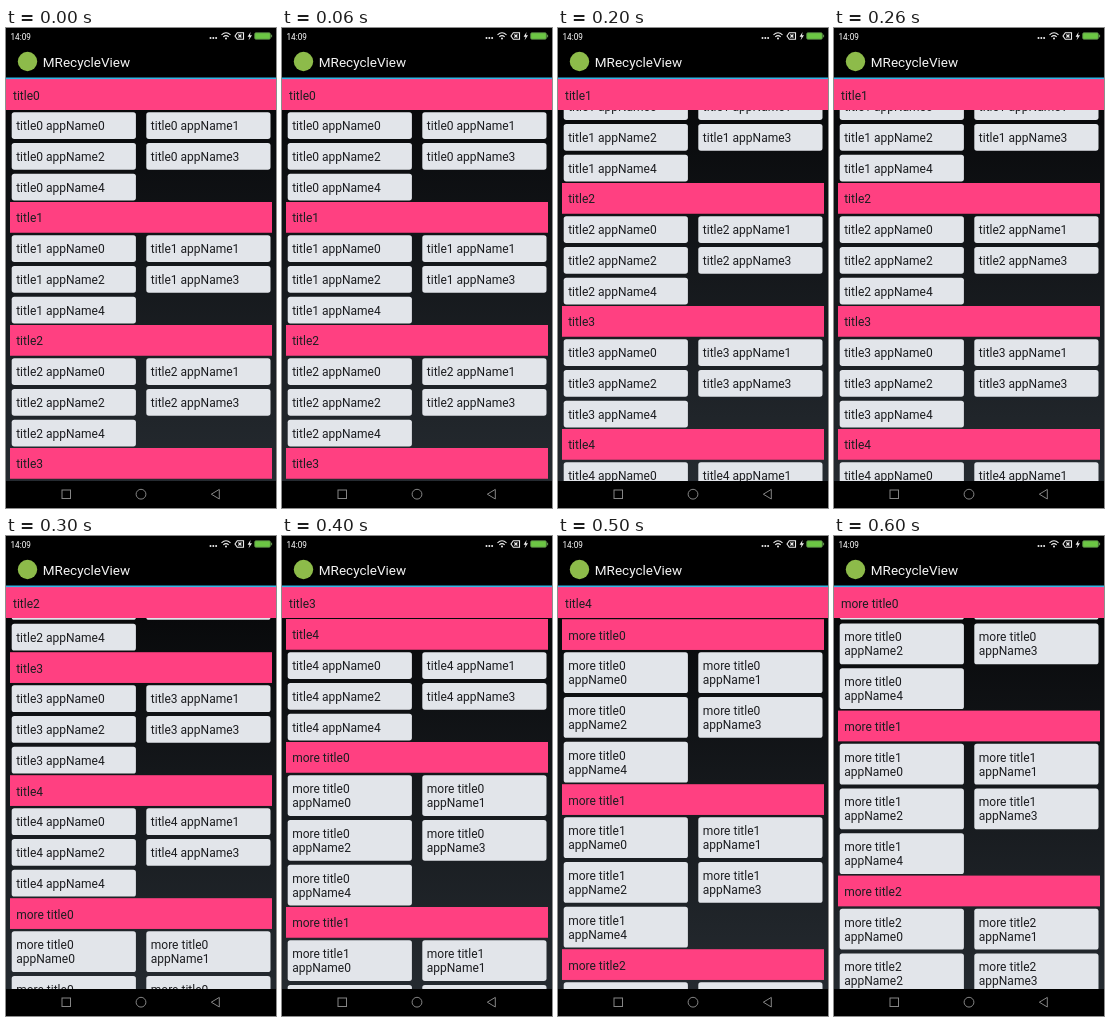
These frames come from a looping animation (270 px wide and 480 px high, 0.7 s). An HTML page:

```html
<!DOCTYPE html>
<html lang="en">
<head>
<meta charset="utf-8">
<title>Sticky section list</title>
<style>
  html, body { margin: 0; width: 100%; height: 100%; overflow: hidden; background: #000; }
  svg { display: block; width: 100%; height: 100%; }
  text { font-family: Roboto, "Noto Sans", sans-serif; font-size: 12px; fill: #1c1d20; }
  .bar { fill: #ff4081; }
  .item { fill: #e2e5ea; }
  .nav { fill: none; stroke: #858585; stroke-width: 1; }
</style>
</head>
<body>
<svg viewBox="0 0 270 480">
  <defs>
    <linearGradient id="backdrop" x1="0" y1="0" x2="0" y2="1">
      <stop offset="0" stop-color="#020203"/>
      <stop offset="1" stop-color="#272d33"/>
    </linearGradient>
    <clipPath id="viewport"><rect y="51" width="270" height="402"/></clipPath>
  </defs>
  <rect width="270" height="480" fill="url(#backdrop)"/>
  <g id="list" clip-path="url(#viewport)"></g>
  <rect class="bar" y="51" width="270" height="31"/>
  <text id="sticky" x="7" y="71.8"></text>

  <!-- status and title bars -->
  <rect width="270" height="50" fill="#000"/>
  <rect y="49.5" width="270" height="1.6" fill="#33b5e5"/>
  <text x="4.5" y="11.5" style="font-size:8.2px;fill:#fff">14:09</text>
  <g fill="#eee">
    <circle cx="204.5" cy="10" r="1"/><circle cx="207.3" cy="10" r="1"/><circle cx="210.1" cy="10" r="1"/>
    <circle cx="220" cy="10.6" r="1"/>
    <path d="M244.6 4 241.6 8.7H243.6L242.6 12.2 246 7.3H244Z"/>
  </g>
  <g fill="none" stroke="#eee" stroke-width="1.1">
    <path d="M215.5 6.8Q220 2.8 224.5 6.8M217.3 8.8Q220 6.5 222.7 8.8"/>
    <path d="M229 8 231.3 4.8H237.5V11.2H231.3ZM232.4 6.5 235.4 9.5M235.4 6.5 232.4 9.5"/>
  </g>
  <rect x="248.7" y="4.8" width="15.6" height="6.4" rx="1.2" fill="#6cc644" stroke="#5c8a4a" stroke-width=".8"/>
  <rect x="264.8" y="6.7" width="1.3" height="2.6" fill="#5c8a4a"/>
  <circle cx="21.5" cy="33.5" r="9.7" fill="#8dbb4a"/>
  <text x="36.8" y="39" style="font-size:13.5px;fill:#f3f3f3">MRecycleView</text>

  <!-- navigation bar -->
  <rect y="453" width="270" height="27" fill="#000"/>
  <rect class="nav" x="56" y="462" width="8.5" height="8.5"/>
  <circle class="nav" cx="135" cy="466.2" r="4.9"/>
  <path class="nav" d="M213.3 461.4V471L205.3 466.2Z"/>
</svg>
<script>
const TOP = 51, BOTTOM = 453, HEADER = 30.75, ROW = 30.75, LINE = 14;
const STEP = 100;
const scrollStops = [0, 0, 142, 303.8, 460, 582.8, 656.4];

const sections = [];
let contentHeight = 0;
for (let i = 0; i < 8; i++) {
  const title = i < 5 ? `title${i}` : `more title${i - 5}`;
  const lines = i < 5 ? 1 : 2;
  const pitch = ROW + (lines - 1) * LINE;
  sections.push({ title, lines, pitch, y: contentHeight });
  contentHeight += HEADER + 3 * pitch;
}

const rect = (cls, x, y, w, h, r = 0) =>
  `<rect class="${cls}" x="${x}" y="${y}" width="${w}" height="${h}" rx="${r}"/>`;
const label = (x, middle, value) => `<text x="${x}" y="${middle + 4.3}">${value}</text>`;

function item(section, index, y) {
  const x = index % 2 ? 140.3 : 5.7;
  const height = section.pitch - 4;
  const middle = y + height / 2 + 0.3;
  const name = `appName${index}`;
  const caption = section.lines === 1
    ? label(x + 4.5, middle, `${section.title} ${name}`)
    : label(x + 4.5, middle - LINE / 2, section.title) + label(x + 4.5, middle + LINE / 2, name);
  return rect('item', x, y, 124.2, height, 2.6) + caption;
}

function drawSection(section, y) {
  let out = rect('bar', 4, y, 262, HEADER) + label(10.2, y + 16, section.title);
  for (let i = 0; i < 5; i++) {
    out += item(section, i, y + HEADER + 2.4 + Math.floor(i / 2) * section.pitch);
  }
  return out;
}

const list = document.getElementById('list');
const sticky = document.getElementById('sticky');
let shown = -1;

function render(time) {
  const step = Math.floor(time / STEP) % scrollStops.length;
  if (step !== shown) {
    shown = step;
    const scroll = scrollStops[step];
    list.innerHTML = sections
      .filter(s => TOP + s.y - scroll < BOTTOM)
      .map(s => drawSection(s, TOP + s.y - scroll)).join('');
    sticky.textContent = sections.filter(s => s.y <= scroll).pop().title;
  }
}

const start = performance.now();
function tick() {
  render(performance.now() - start);
  requestAnimationFrame(tick);
}
tick();
</script>
</body>
</html>
```
